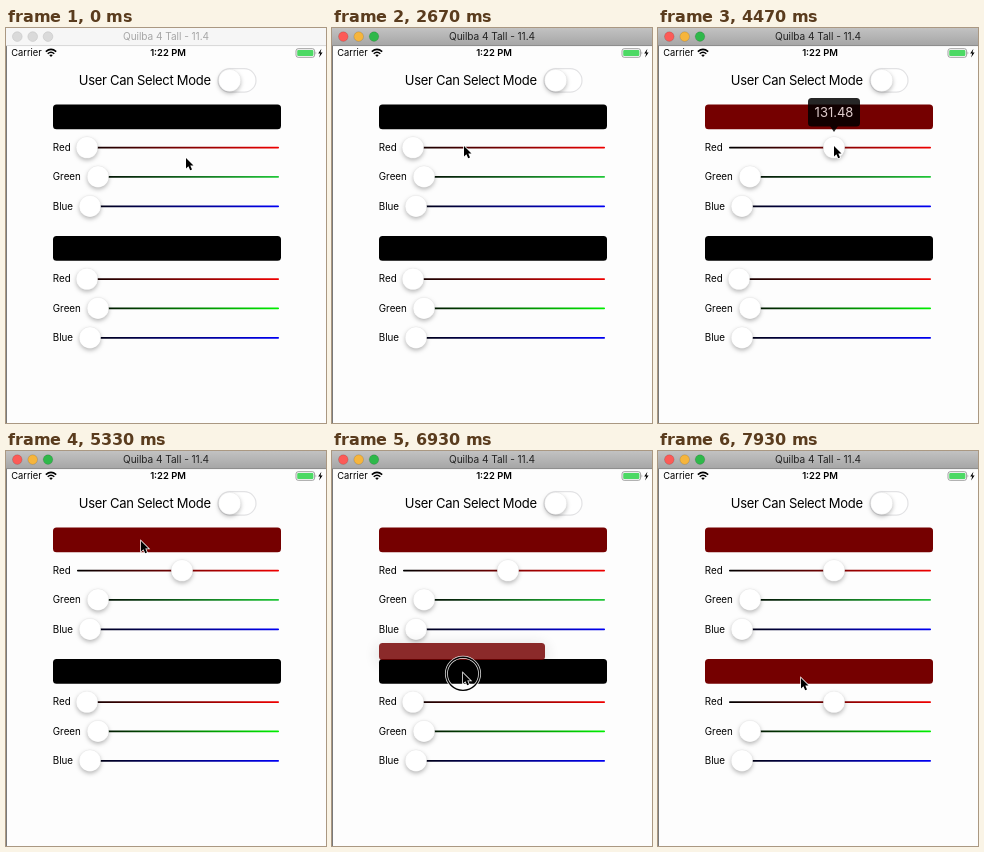
Write an HTML page that moves like this. It is 320 px wide and 395 px high and loops after 8 s.

```html
<!DOCTYPE html>
<html lang="en">
<head>
<meta charset="utf-8">
<title>Colour sliders</title>
<style>
  html, body { margin: 0; width: 100%; height: 100%; overflow: hidden; background: #fdfdfd; }
  svg { display: block; width: 100%; height: 100%; font-family: Inter, Roboto, sans-serif; }
  .knob { fill: #fff; stroke: #0000001a; stroke-width: .4; filter: drop-shadow(0 2px 2px #0004); }
  .label { font-size: 9.8px; }
</style>
</head>
<body>
<svg viewBox="0 0 320 395">
  <defs>
    <linearGradient id="chrome" x2="0" y2="1">
      <stop stop-color="#c2c2c2"/><stop offset="1" stop-color="#a5a5a5"/>
    </linearGradient>
  </defs>
  <rect width="320" height="395" fill="#fdfdfd"/>
  <path d="M.4 18V395" stroke="#444" stroke-width=".8"/>

  <g id="titlebar">
    <rect id="bar" width="320" height="18"/>
    <path id="rule" d="M0 17.6H320" stroke-width=".8"/>
    <g id="lights" stroke-width=".6">
      <circle cx="11.3" cy="8.6" r="4.8"/><circle cx="26.7" cy="8.6" r="4.8"/><circle cx="42" cy="8.6" r="4.8"/>
    </g>
    <text id="title" x="160" y="12.4" font-size="10.1" text-anchor="middle" letter-spacing="-.05">Quilba 4 Tall - 11.4</text>
  </g>

  <g id="status">
    <text x="5.3" y="28.4" font-size="9.3">Carrier</text>
    <g fill="none" stroke="#000" stroke-width="1.5">
      <path d="M39.8 23.6Q45 19.2 50.2 23.6M41.7 25.7Q45 22.8 48.3 25.7"/>
      <path d="M43.2 27.1Q45 25.7 46.8 27.1L45 29Z" fill="#000" stroke="none"/>
    </g>
    <text x="162" y="28.4" font-size="9.4" font-weight="600" text-anchor="middle">1:22 PM</text>
    <rect x="290" y="20.7" width="18.6" height="8.6" rx="2.2" fill="none" stroke="#888" stroke-width=".8"/>
    <rect x="291.2" y="21.9" width="16.2" height="6.2" rx="1.1" fill="#4cd964"/>
    <path d="M309.6 23.5q1.5 1.5 0 3z" fill="#888"/>
    <path d="M315.4 20.8l-3.2 4.8h2l-1.1 3.8 3.5-5h-2.1z"/>
  </g>

  <text x="72.8" y="57" font-size="13" letter-spacing="-.3">User Can Select Mode</text>
  <rect x="212" y="40.7" width="38" height="23.4" rx="11.7" fill="#fff" stroke="#e2e2e4" stroke-width="1.2"/>
  <circle class="knob" cx="223.7" cy="52.4" r="11"/>

  <g id="panels"></g>
  <rect id="preview" rx="3.5"/>

  <g id="tip">
    <rect id="tipBox" y="70" height="28.5" rx="3.5"/>
    <path d="M-4 98H4L0 104Z" id="tipArrow"/>
    <text id="tipText" y="89" font-size="13" fill="#f4f4f4" text-anchor="middle"></text>
  </g>

  <g id="pointer">
    <g id="touch" fill="none">
      <circle r="16.6" cy=".8" stroke="#fff" stroke-opacity=".85" stroke-width="3"/>
      <circle r="16.6" cy=".8" stroke="#000" stroke-width="1.4"/>
    </g>
    <path d="M0 0V10.4L2.4 8.2 4.2 12.3 6 11.5 4.3 7.6H7.5Z" stroke="#fff" stroke-width="1.5" paint-order="stroke"/>
  </g>
</svg>
<script>
const LOOP = 8000, STEP = 1000 / 15;
const ACTIVATE = 460, DROP = 7190, FINAL = 131.48;
const $ = id => document.getElementById(id);

// Rows are [time, ...values]; the optional ease shapes each segment.
const linear = u => u;
const smooth = u => u * u * (3 - 2 * u);
function track(rows, t, ease = linear) {
  const next = rows.findIndex(row => row[0] > t);
  if (next === 0) return rows[0].slice(1);
  if (next < 0) return rows[rows.length - 1].slice(1);
  const a = rows[next - 1], b = rows[next];
  const u = ease((t - a[0]) / (b[0] - a[0]));
  return a.slice(1).map((v, i) => v + (b[i + 1] - v) * u);
}

const pointerPath = [
  [0, 180, 130], [900, 178, 129], [1800, 150, 121], [2670, 132, 118],
  [3150, 82, 116], [3350, 82, 115], [3670, 97.5, 114], [4350, 176, 118],
  [4650, 176, 118], [5250, 135, 90], [6250, 135, 90], [6930, 131, 222],
  [7400, 131, 224], [7900, 143, 227]
];
const redValue = [[3350, 0], [3670, 22.6], [4350, FINAL]];
const copiedValue = [[DROP, 0], [DROP + 140, FINAL]];
const tipAlpha = [[3300, 0], [3460, 1], [4400, 1], [4470, .84], [4680, 0]];
// x, y, width, height, opacity, shadow
const previewPath = [
  [5800, 47, 76.5, 228, 24.5, 1, 0], [6130, 42.2, 76, 237, 26, 1, 1],
  [6260, 42.2, 76, 237, 26, 1, 1], [6930, 47, 192, 166, 17, .83, .6],
  [7130, 60, 211, 166, 18, .83, .6], [7400, 108, 216, 100, 10, 0, 0]
];
const presses = [[3250, 4400], [5400, 7130]];

const shade = value => `rgb(${Math.round(value * .89)},0,0)`;
const knobX = value => 81 + value * 95 / FINAL;
const set = (el, attrs) => Object.entries(attrs).forEach(([k, v]) => el.setAttribute(k, v));

function panel(id, top, green) {
  const rows = [['Red', 81, '#f00000', 43], ['Green', 92, green, 72.2], ['Blue', 84, '#0000f4', 101.7]];
  return `<rect id="swatch${id}" x="47" y="${top}" width="228" height="24.7" rx="3.5"/>` +
    rows.map(([name, x, color, dy]) => {
      const y = top + dy, grad = name + id;
      return `<linearGradient id="${grad}"><stop/><stop offset="1" stop-color="${color}"/></linearGradient>
        <text class="label" x="46.8" y="${y + 3.4}">${name}</text>
        <rect x="${x - 10}" y="${y - .7}" width="${283 - x}" height="1.7" rx=".8" fill="url(#${grad})"/>
        <circle class="knob" id="knob${grad}" cx="${x}" cy="${y}" r="10.8"/>`;
    }).join('');
}
$('panels').innerHTML = panel(1, 76.5, '#20c838') + panel(2, 208, '#00f000');

function drawTitlebar(active) {
  $('bar').setAttribute('fill', active ? 'url(#chrome)' : '#f6f6f6');
  $('rule').setAttribute('stroke', active ? '#858585' : '#d0d0d0');
  $('title').setAttribute('fill', active ? '#222' : '#a6a6a6');
  const colors = active ? ['#fc5b57', '#f6b53c', '#2fb84a'] : Array(3).fill('#dadada');
  [...$('lights').children].forEach((dot, i) =>
    set(dot, { fill: colors[i], stroke: active ? '#0003' : '#c4c4c4' }));
}

function drawTip(value, alpha) {
  const label = String(+value.toFixed(2)), x = knobX(value);
  const width = 13 + label.replace('.', '').length * 7.1 + 3.5;
  set($('tip'), { opacity: alpha });
  set($('tipBox'), { x: x - width / 2, width });
  set($('tipArrow'), { transform: `translate(${x})` });
  set($('tipText'), { x });
  $('tipText').textContent = label;
}

function draw(t) {
  const [value] = track(redValue, t), [copy] = track(copiedValue, t, smooth);
  drawTitlebar(t >= ACTIVATE);
  set($('swatch1'), { fill: shade(value) });
  set($('swatch2'), { fill: shade(t >= DROP ? FINAL : 0) });
  set($('knobRed1'), { cx: knobX(value) });
  set($('knobRed2'), { cx: knobX(copy) });
  drawTip(value, track(tipAlpha, t)[0]);

  const [x, y, width, height, opacity, shadow] = track(previewPath, t, smooth);
  const lifted = t >= previewPath[0][0];
  set($('preview'), { x, y, width, height, opacity: lifted ? opacity : 0, fill: shade(FINAL) });
  $('preview').style.filter = `drop-shadow(0 3px 8px rgba(0,0,0,${.32 * shadow}))`;

  const [px, py] = track(pointerPath, t, t > 3340 && t < 4360 ? linear : smooth);
  set($('pointer'), { transform: `translate(${px} ${py})` });
  set($('touch'), { opacity: presses.some(([a, b]) => t >= a && t < b) ? 1 : 0 });
}

const start = performance.now();
function tick() {
  const t = (performance.now() - start) % LOOP;
  draw(Math.floor(t / STEP + .05) * STEP);
  requestAnimationFrame(tick);
}
tick();
</script>
</body>
</html>
```
